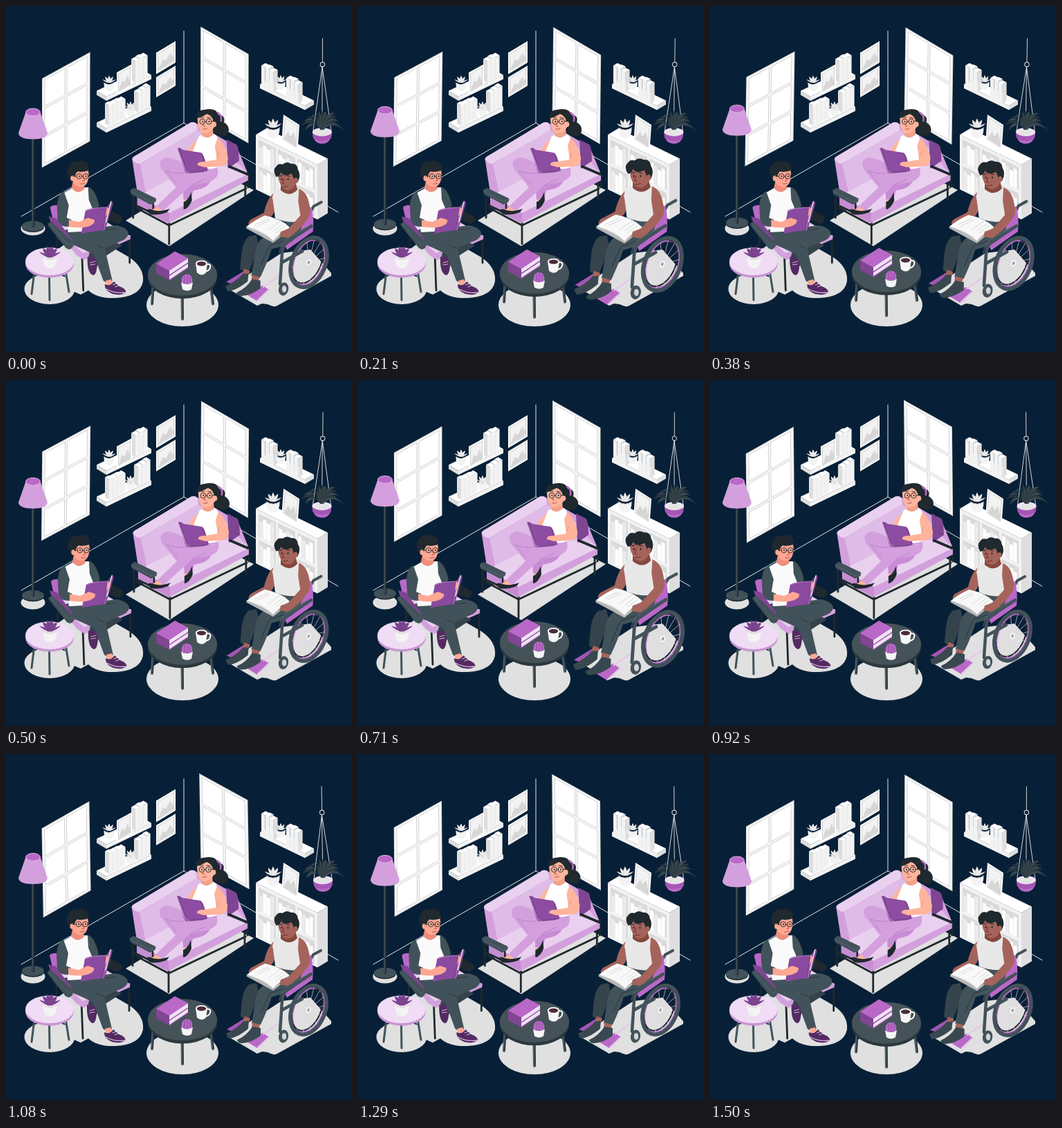
Write an HTML page that moves like this. It is 500 by 500 pixels and loops after 1.54 s.

```html
<!DOCTYPE html>
<html lang="en">
<head>
<meta charset="utf-8">
<title>Reading room</title>
<style>
html, body { margin: 0; width: 100%; height: 100%; overflow: hidden; background: #082037; }
svg { display: block; width: 100vw; height: 100vh; }
</style>
</head>
<body>
<svg id="stage" viewBox="0 0 500 500"></svg>
<script>
const dark = '#42525a', ink = '#1f292e', purple = '#ba68c8', plum = '#7f4592', shade = '#e0e0e0';
const skin = '#ffb49c', rosy = '#ffa793', brown = '#a5645b', lilac = '#d3a0dd', pale = '#e9d0ef';

// Shape helpers
const poly = (points, fill, more = '') => `<polygon points="${points}" fill="${fill}" ${more}/>`;
const path = (d, fill, more = '') => `<path d="${d}" fill="${fill}" ${more}/>`;
const line = (d, color, width = 1) =>
  path(d, 'none', `stroke="${color}" stroke-width="${width}" stroke-linecap="round" stroke-linejoin="round"`);
const oval = (x, y, rx, ry, fill, more = '') =>
  `<ellipse cx="${x}" cy="${y}" rx="${rx}" ry="${ry}" fill="${fill}" ${more}/>`;
const rect = (x, y, w, h, fill, more = '') =>
  `<rect x="${x}" y="${y}" width="${w}" height="${h}" fill="${fill}" ${more}/>`;
const group = (id, ...parts) => `<g id="${id}">${parts.join('')}</g>`;
const slant = (slope, x, y, inner) => `<g transform="matrix(1 ${slope} 0 1 ${x} ${y})">${inner}</g>`;

// Isometric box; (x, y) is the lower left corner of its front face
function block(x, y, w, h, slope, depth) {
  const dx = slope < 0 ? -depth : depth, dy = -depth * .6;
  const right = x + w, low = y + w * slope;
  const ex = slope < 0 ? x : right, ey = slope < 0 ? y : low;
  return poly([x, y, right, low, right, low - h, x, y - h], '#f2f2f2') +
    poly([x, y - h, right, low - h, right + dx, low - h + dy, x + dx, y - h + dy], '#fff') +
    poly([ex, ey, ex + dx, ey + dy, ex + dx, ey - h + dy, ex, ey - h], '#dedede');
}
const books = (x, y, slope, heights, w = 6) => {
  const row = heights.map((h, i) => block(x + i * w, y + i * w * slope, w - .4, h, slope, 6));
  return (slope < 0 ? row.reverse() : row).join('');
};

function leaves(x, y, count, length, color, spread = 1.1) {
  let out = '';
  for (let i = 0; i < count; i++) {
    const a = (i / (count - 1) * 2 - 1) * spread, w = length * .19;
    const px = x + Math.sin(a) * length, py = y - Math.cos(a) * length;
    out += path(`M${x - w} ${y}Q${(x + px) / 2 - w * 1.5} ${(y + py) / 2} ${px} ${py}` +
      `Q${(x + px) / 2 + w * 1.5} ${(y + py) / 2} ${x + w} ${y}Z`, color, 'stroke="#0002" stroke-width=".5"');
  }
  return out;
}
const pot = (x, y, r, leaf) => leaves(x, y, 5, r * 1.45, leaf) +
  path(`M${x - r} ${y}Q${x - r} ${y + r * 1.6} ${x} ${y + r * 1.6}T${x + r} ${y}Q${x} ${y + r * .7} ${x - r} ${y}Z`, '#f3f3f3') +
  line(`M${x - r} ${y}Q${x} ${y + r * .7} ${x + r} ${y}`, '#d4d4d4', .8);

function windowPane() {
  let out = rect(0, 0, 69.5, 129, '#d9d9d9') + rect(1, 1, 67.5, 127, '#f7f7f7');
  for (let i = 0; i < 6; i++)
    out += rect(4 + i % 2 * 32, 4 + (i >> 1) * 41.5, 29, 38, '#fff', 'stroke="#c9c9c9" stroke-width=".8"');
  return out;
}
const picture = (w, h) => rect(0, 0, w, h, '#fff') +
  rect(2.5, 3, w - 5, h - 6, '#f2f2f2', 'stroke="#cfcfcf"') +
  path(`M3 ${h - 4}L${w * .35} ${h * .5}L${w * .5} ${h * .65}L${w * .72} ${h * .4}L${w - 3} ${h * .7}V${h - 4}Z`, '#d6d6d6');

function bookcase() {
  let inside = '';
  for (let c = 0; c < 3; c++) for (let r = 0; r < 2; r++) {
    inside += rect(4 + c * 28, 5 + r * 38, 25, 33, '#dadada');
    for (let b = 0; b < 4; b++) {
      const h = 23 + (b * 5 + c * 3 + r * 4) % 8;
      inside += rect(5 + c * 28 + b * 5.5, 38 + r * 38 - h, 5, h, (b + c) % 3 ? '#fff' : '#ececec');
    }
  }
  return block(361, 265, 89, 79, .49, 15) + slant(.49, 361, 186, inside) +
    pot(386, 176, 9.5, '#ededed') + `<g transform="translate(401 157) rotate(4)">${slant(.55, 0, 0, picture(24, 37))}</g>`;
}

const room = () =>
  line('M257 36V169L22 304M257 169L480 298', '#dfe3e6') +
  oval(39, 321.5, 17.5, 10, shade) +
  poly('173,310 236,347 358,266 296,235', shade) +
  oval(63, 409, 36.5, 22, shade) +
  path('M70 355L112 325L178 363Q200 378 198 398Q194 420 158 422Q132 423 119 411L108 417L94 411Z', shade) +
  oval(255, 432, 52, 31, shade) +
  path('M320 408L398 357L440 352L470 386V390L392 433Q388 436 378 431L370 430L363 433Z', shade);

const shelves = () =>
  block(145, 137, 65, 6, -.48, 14) + books(187, 111, -.5, [31, 32, 31]) +
  slant(-.55, 160, 96, picture(22, 32)) + pot(149, 111, 7.5, '#f0f0f0') +
  block(145, 183, 65, 6, -.48, 14) + books(149, 173, -.5, [29, 28, 28, 27]) +
  books(191, 154, -.5, [28, 29, 30]) + pot(180, 148, 7, '#f0f0f0') +
  slant(-.6, 217, 67.5, picture(28, 31)) + slant(-.6, 217, 103, picture(28, 29)) +
  block(367, 119, 65, 6, .48, 13) + books(369, 115, .5, [29, 30, 28]) +
  pot(397, 110, 7, '#f0f0f0') + books(405, 132, .5, [28, 29, 27]);

const lamp = () =>
  oval(39, 320, 16, 7.5, ink) + oval(39, 318.5, 16, 7.5, dark) + line('M39.2 185V318', ink, 4) + line('M38.4 185V318', dark, 2) +
  path('M28.5 154L18 184Q19 193 39 193T60 184L49.5 154Z', lilac) + oval(39, 154, 10.5, 5.4, purple, 'stroke="#e0b5e8"');

const hanger = () => {
  let fronds = '';
  for (let i = 0; i < 15; i++) {
    const a = (i / 7 - 1) * 1.5, r = 26 + i * 7 % 9;
    const x = 457 + Math.sin(a) * r * .95, y = 178 - Math.cos(a) * r;
    fronds += path(`M455 179Q${457 + Math.sin(a) * 16 - 2} ${160 - Math.cos(a) * 14} ${x} ${y + 4}` +
      `Q${457 + Math.sin(a) * 13 + 2} ${166 - Math.cos(a) * 12} 459 179Z`, i % 2 ? '#2b383e' : '#39484f');
  }
  return line('M457.3 47V81M457 88L444 180M457 88V182M457 88L470 180', '#e6e6e6', .9) +
    `<circle cx="457.3" cy="84.5" r="3.2" fill="none" stroke="#e6e6e6"/>` +
    path('M443 182Q444 199 457 199T471 182Z', purple) + oval(457, 182, 14, 6, '#f3e6f6') + oval(457, 183, 11, 4.5, '#e4e4e4') +
    fronds + path('M443 184Q457 194 471 184L470 191Q457 199 444 191Z', '#a455b5');
};

const glasses = (x1, x2, y, r) => [x1, x2].map(x =>
  `<circle cx="${x}" cy="${y}" r="${r}" fill="none" stroke="${ink}" stroke-width=".9"/>` + oval(x + .3, y, .9, 1.3, ink)).join('') +
  line(`M${x1 + r} ${y}H${x2 - r}M${x2 + r} ${y}L${x2 + r + 4} ${y - 1}`, ink, .9);

const sofa = () =>
  line('M184 272V306M350 243V262M346 257V281M236 312V344', ink, 2.8) +
  line('M189 292L236 317L347 264', ink, 3) +
  path('M183 224Q181 219 186 217L266 169Q271 166 276 170L334 204L349 240L236 299L191 276Z', lilac) +
  path('M194 229L276 179L318 205L345 238L236 294L206 285Z', '#dfbce7') +
  path('M183 222Q183 218 190 215L266 169Q271 166 276 171L277 179L194 228Q187 228 183 222Z', pale) +
  path('M190 275L283 226L342 236Q351 239 350 247L238 301Z', pale) +
  path('M190 275L236 299L350 243V252L237 313Q235 315 231 312L190 290Z', lilac) +
  path('M190 275L236 299V314L190 290Z', '#c78dd2') +
  path('M319 193L333 200Q337 203 337 224L321 235Z', plum) + line('M323 232L349 243', ink, 4) +
  path('M180 268Q179 265 186 263L217 278Q218 282 215 284L209 287L181 272Z', dark) + line('M181 268L210 283L217 279', '#5a6a72', .8) +
  line('M213 286V300L186 287', ink, 2.6);

const woman = () =>
  path('M276 162Q274 151 286 150Q304 146 307 157Q318 158 315 168Q325 174 321 184Q317 191 307 186Q298 184 302 174L295 160Z', ink) +
  line('M306 154Q313 158 311 166', purple, 2.5) +
  path('M298 236Q300 258 283 264L271 267L267 282L257 280Q254 262 265 247Z', '#c98bd5') +
  path('M305 232Q312 250 290 255L268 259L225 298L217 290L246 262L224 235Q219 222 232 219Q247 219 270 237L286 232Z', lilac) +
  path('M248 258L231 238Q249 246 272 238M288 250L268 259', 'none', 'stroke="#bd80ca"') +
  path('M219 290L227 297L218 300L210 295Z', skin) + path('M202 295Q208 292 213 295Q223 298 237 293L233 298Q220 303 209 301Z', ink) +
  path('M258 279L267 281L264 285L258 287Z', skin) + path('M257 283Q263 282 268 269L269 281Q264 293 257 294Z', ink) +
  path('M278 191Q266 201 262 211L268 222L284 206Z', skin) +
  path('M279 188Q289 183 301 185Q310 190 308 216L306 233Q292 239 278 230L270 210Z', '#fff') +
  path('M284 179L299 174L300 186Q290 194 283 187Z', '#f2a28b') +
  path('M277 164Q276 157 284 155L298 155Q305 164 302 174Q296 184 287 184Q278 184 277 164Z', skin) +
  path('M275 163Q279 151 293 152Q303 156 305 171L300 167Q299 159 291 156Q284 160 275 163Z', ink) +
  oval(301.5, 171, 2.8, 3.8, skin) + glasses(284, 293.5, 167, 3.8) + line('M287 168L285 173L288 174M285 178Q288 179 291 177', '#a04c4a', .9) +
  line('M281 161L286 161M291 161L296 162', ink, .9) +
  path('M248 206Q250 203 256 208L282 212Q286 212 292 238L285 240L263 242Q258 240 257 233Z', plum) +
  path('M252 208L282 213L290 237L263 240Z', '#8d4da2') + line('M248 206L260 238L266 242', '#cfa5d8', 1) +
  path('M306 191Q314 194 321 218Q322 231 309 232L287 233L277 230Q276 225 286 225L305 222L302 202Z', skin) +
  line('M305 221L308 212', '#e48f7c', .8);

const man = () =>
  line('M179 335V371M110 357L112 411M74 330V346M138 305V290', ink, 2.8) +
  path('M64 291Q67 287 77 288L84 330L98 350L71 322Z', purple) +
  path('M119 262Q129 262 134 284L126 288Z', ink) +
  path('M72 320L130 303L181 333L113 364Q108 364 104 359Z', pale) + path('M74 325L112 357L180 331V337L113 367L102 360Z', lilac) +
  path('M137 291L146 292L168 305Q170 311 162 315L137 305Z', ink) +
  path('M122 353L118 368L130 380L137 366L168 346L148 336Z', '#35444c') +
  path('M118 362Q123 367 130 359L132 370Q132 389 126 389Q117 386 118 362Z', '#542a62') +
  path('M85 324Q113 315 128 321L159 317Q177 320 177 330Q176 337 161 342L143 350L154 397Q147 402 141 397L127 359Q110 350 89 342Z', dark) +
  line('M130 323Q150 324 160 322M141 350L132 346', '#2b3940', 1) +
  path('M144 397L152 395L155 402L145 403Z', rosy) + path('M143 402Q151 406 156 398L164 405Q175 409 173 414Q167 419 154 416Q142 411 143 402Z', '#542a62') +
  line('M145 409Q158 416 172 414', '#d9b3e2', 1.3) + line('M155 403L160 401M158 406L163 404', '#fff', .8) + line('M122 371L129 369M122 374L129 373', '#fff', .7) +
  path('M84 270L96 263L118 262Q129 264 131 288L127 325L90 327Z', '#fafafa') +
  path('M119 262Q129 264 135 289L127 297L120 280Z', dark) +
  path('M97 253L112 254L114 264Q104 274 95 263Z', '#ee8d7c') +
  path('M93 240Q103 231 119 236Q122 251 115 259Q106 265 98 256Z', rosy) +
  path('M92 250Q86 240 91 231Q97 223 104 225Q112 222 117 227Q122 231 119 238Q109 241 104 239Q100 242 99 250L96 254Z', ink) +
  oval(96.5, 249, 3, 4, rosy) + glasses(106, 115.5, 246, 3.7) + line('M102 246L97 246', ink, .9) + line('M111 247L114 252L111 253M108 257Q111 258 114 256', '#a04c4a', .9) +
  path('M115 296Q120 291 147 291L142 324Q128 325 109 329Z', '#8a4a9f') + path('M145 292L153 281L155 285L144 322L139 325Z', plum) +
  line('M115 296Q128 291 147 291L142 324', '#bd8bc9', .9) + line('M152 283L145 312', '#ead8ef', 1.6) + path('M146 291Q151 293 148 299L144 304Z', rosy) +
  path('M84 268Q75 271 74 290L75 310Q77 319 91 319L95 309L88 306L91 288Z', dark) +
  path('M91 309L106 312L119 306L128 309Q130 314 121 318Q110 322 91 319Z', rosy) +
  path('M62 304L73 307L96 338L88 347L70 328Z', plum) +
  path('M61 317Q60 312 67 313L98 342Q99 349 92 352L87 350Z', dark) + line('M64 315L90 345L97 343', '#5a6a72', .8);

const sideTable = () =>
  line('M41 384L37 416M62.5 388L63 425M86 382L91 413', dark, 3) +
  oval(63, 372.5, 35, 20, '#c996d3') + oval(63, 369, 35, 20, '#f0dcf4') +
  leaves(63.5, 363, 6, 17, plum) + pot(63.5, 363, 10, plum);

const table = () =>
  line('M212.5 404L211 431M254.5 420L255 453M296 405L299 431', '#4b5b63', 4) + line('M213.5 404L212 431M255.8 420L256 453M297 405L300 431', ink, 1.2) +
  oval(255, 393, 50, 30.5, '#2b383e') + oval(255, 389, 50, 30, '#455359') +
  [4, -3].map(dy => poly([217, 376 + dy, 236, 386 + dy, 236, 393 + dy, 217, 383 + dy], plum) +
    poly([236, 386 + dy, 263, 368 + dy, 263, 375 + dy, 236, 393 + dy], '#f0e2f3') +
    poly([217, 376 + dy, 244, 358 + dy, 263, 368 + dy, 236, 386 + dy], purple) +
    line(`M236 ${393 + dy}L263 ${375 + dy}`, '#8d4da2', 1.4)).join('') +
  line('M289 374Q297 372 295 379Q293 384 288 384', '#fff', 2) + path('M274 372L276 386Q283 392 289 386L291 372Z', '#f5f5f5') +
  oval(282.5, 372.5, 8.5, 4.5, '#fff') + oval(282.5, 373, 6.7, 3.2, '#4c2b3c') +
  path('M254 402Q252 389 261 388Q271 388 269 402Z', purple) + line('M258 400V391M262 401V389M266 400V392', plum, .8) +
  path('M253 400L255 410Q262 414 268 410L270 400Q261 405 253 400Z', '#f5f5f5');

function wheel() {
  let spokes = '';
  for (let i = 0; i < 14; i++) {
    const a = i * Math.PI / 7;
    spokes += `M0 0L${21 * Math.cos(a)} ${33 * Math.sin(a)}`;
  }
  return `<g transform="translate(437 370) rotate(22)">` +
    oval(0, 0, 21.5, 34, 'none', `stroke="${purple}" stroke-width="3.5"`) +
    oval(-2.5, -1, 20, 33, 'none', `stroke="${ink}" stroke-width="2"`) +
    oval(0, 0, 24, 37, 'none', `stroke="${dark}" stroke-width="5.5"`) +
    line(spokes, '#d8d4de', .6) + oval(0, 0, 3.6, 5, '#f3f3f3') + oval(0, 0, 1.6, 2.4, '#9b9b9b') + '</g>';
}

const wheelchair = () =>
  line('M440 297L444 290L455 284', dark, 4) + path('M428 294L441 291Q445 308 443 326L406 352L398 336Z', purple) +
  path('M345 414L371 403L380 409L363 425Z', purple) + path('M319 398L348 380L353 384L330 402Z', '#a455b5') +
  line('M372 405L397 388M364 424L380 409', '#e5c5eb', 2) +
  path('M362 331L351 333Q343 340 341 357L339 379Q345 385 352 382L366 347Z', '#35444c') +
  path('M345 379L353 382L351 388L342 387Z', brown) + path('M318 404Q335 396 343 386L351 386L350 397Q333 411 321 411Z', '#39484f') +
  path('M395 307Q425 302 427 319Q424 336 402 346L384 351Q378 370 368 391Q362 394 355 389L362 348Q366 337 376 332Z', dark) +
  line('M402 339L381 346L369 373', '#2b3940', 1) +
  path('M356 388L367 391L365 397L355 396Z', brown) + path('M334 413Q348 407 356 394L368 396V407Q355 417 341 418Q335 418 334 413Z', '#39484f') +
  wheel() + line('M441 318L412 337Q400 343 399 356L396 401M399 370L428 354', dark, 4.5) + line('M437 318L408 335Q397 341 395 356', '#566870', 1) +
  oval(401, 408, 7, 9.5, dark, 'transform="rotate(12 401 408)"') + oval(402, 408, 3.2, 4.8, '#d5d5d5') +
  path('M387 271Q378 278 373 299L354 309Q349 314 352 317L377 310Q388 304 392 285Z', brown) +
  path('M388 267L397 264L420 262L430 269Q434 291 428 310Q411 316 389 307Q387 287 385 277Z', '#e8e8e8') +
  path('M397 255L416 248L421 266Q410 278 397 267Z', '#86483f') +
  `<g transform="translate(1.5 0)">` +
  path('M391 241Q399 233 413 236L419 250Q417 265 406 267Q393 266 391 241Z', brown) +
  path('M389 248Q383 238 389 233Q392 228 398 230Q404 225 410 229Q419 228 420 237Q425 245 420 255L415 256Q414 248 411 243Q400 249 396 241Q395 247 389 248Z', ink) +
  oval(417, 253, 3, 4, brown) + oval(397, 251, 1, 1.4, ink) + oval(406, 251, 1, 1.4, ink) + line('M394 247L398 246M404 246L408 247', ink, 1) +
  line('M400 251L398 257L401 258M399 262Q403 263 406 261', '#5a2823', .9) + '</g>' +
  path('M347 321L376 303L411 322L386 342Z', '#b7b7b7') + path('M348 319Q359 310 374 303Q381 306 379 320L386 339Q371 324 348 319Z', '#fff') +
  path('M374 303Q397 307 410 320Q396 327 386 339Q375 328 348 319Q368 316 374 303Z', '#f8f8f8') +
  line('M348 319Q375 326 386 339M379 324L399 309M360 316L378 308M364 318L381 310M387 325L400 315M390 328L403 318', '#cfcfcf', .8) +
  path('M423 265Q435 269 438 288Q442 300 435 309Q423 326 407 335L395 333L397 326L408 322L425 303L422 283Z', brown);

const stage = document.getElementById('stage');
stage.innerHTML = room() +
  group('windows', slant(-.55, 52, 105, windowPane()), slant(.57, 281, 29.5, windowPane())) +
  shelves() + bookcase() + group('hanger', hanger()) + group('lamp', lamp()) +
  group('sofa', sofa(), woman()) + group('man', man()) + sideTable() +
  group('table', table()) + group('wheelchair', wheelchair());

// Linear keyframes: [time, value, time, value, ...]
function track(keys, t) {
  let i = 0;
  while (i < keys.length - 4 && t > keys[i + 2]) i += 2;
  const [t0, v0, t1, v1] = keys.slice(i, i + 4);
  return v0 + (v1 - v0) * (t - t0) / (t1 - t0);
}
const wind = [0, 0, .25, 1, .75, -1, 1, 0];
const float = [0, 0, .5, -10, 1, 0];
const shake = [0, 0, .1, -1, .2, 2, .3, -4, .4, 4, .5, -4, .6, 4, .7, -4, .8, 2, .9, -1, 1, 0];
const beat = [0, 1, .2, 1.085, .35, 1, .5, 1.09, .64, 1, 1, 1];
const move = (id, value) => document.getElementById(id).setAttribute('transform', value);

const LOOP = 1540, STEPS = 37;
function draw(now) {
  const step = Math.floor(now % LOOP / LOOP * STEPS + .1) % STEPS;
  const t = (step + 1) / 36 % 1;
  const angle = track(wind, t), lift = track(float, t), jolt = track(shake, t);
  move('windows', `rotate(${angle} 201 132)`);
  move('hanger', `rotate(${angle} 457 123)`);
  for (const id of ['lamp', 'table']) move(id, `translate(0 ${lift})`);
  for (const id of ['sofa', 'man']) move(id, `translate(${jolt} 0)`);
  move('wheelchair', `translate(397 325) scale(${track(beat, t)}) translate(-397 -325)`);
  requestAnimationFrame(draw);
}
draw(0);
</script>
</body>
</html>
```
